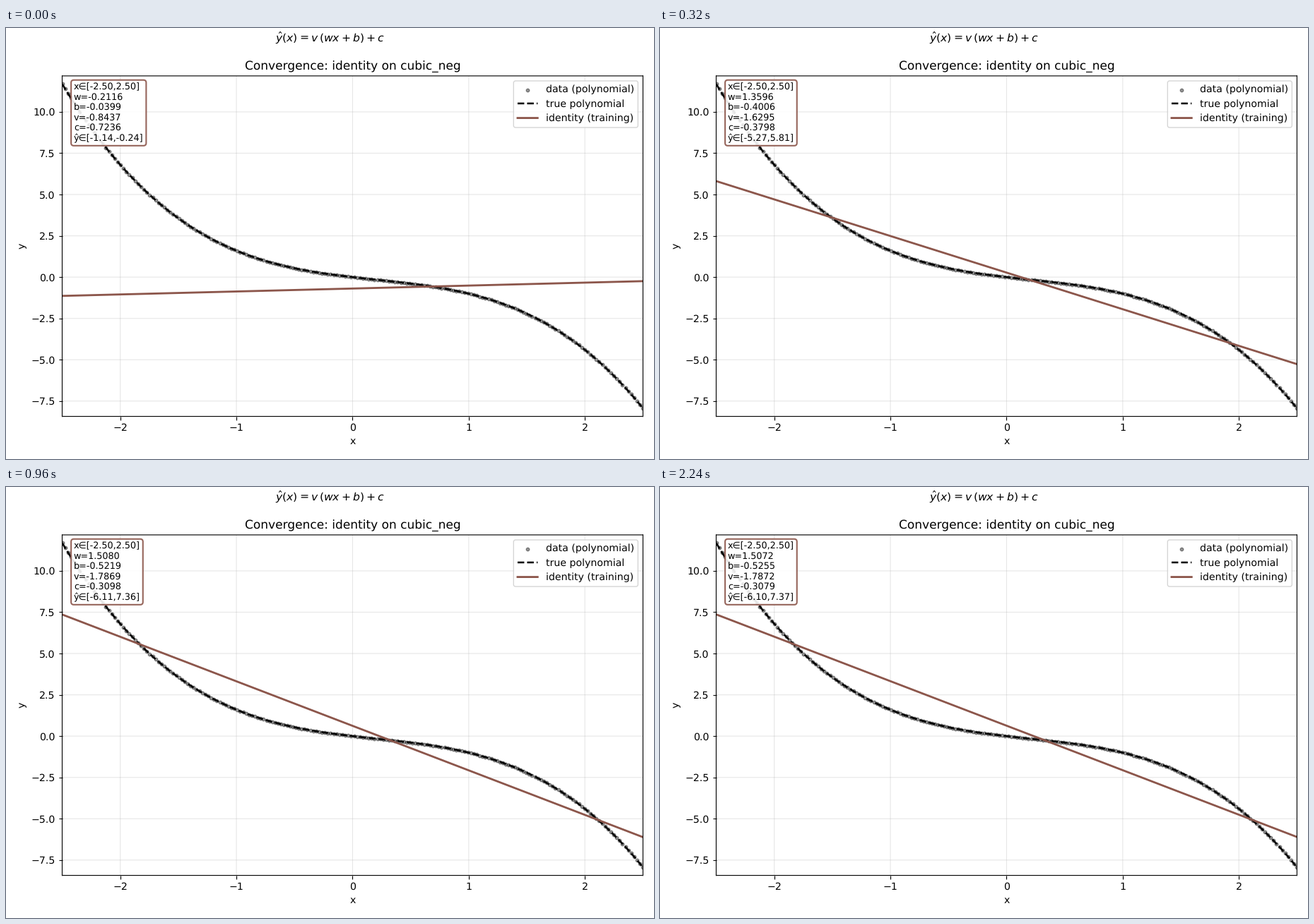
Recreate the animation shown at these times as a matplotlib script. Size 917 by 611 pixels, loop 3.31 s.

```python
import numpy as np
import matplotlib.pyplot as plt
from matplotlib.animation import FuncAnimation

W, H = 917, 611
DPI = 101.875
LEFT, RIGHT, TOP, BOTTOM = 79.5, 901.4, 67.9, 550.6
LOOP_MS, TICK_MS, HOLD_MS = 3310, 10, 80
SNAPSHOTS, STEPS_PER_SNAPSHOT, RATE = 29, 25, 0.002
START = -0.21164, -0.03988, -0.84366, -0.72357
BROWN = "#8c564b"

# Soft sub-pixel edges for lines and glyphs.
plt.rcParams.update({"font.family": "DejaVu Sans", "path.snap": False,
                     "text.hinting": "none"})

x = np.linspace(-2.5, 2.5, 200)
y = -0.5 * x**3 + 0.3 * x**2 - 0.8 * x


def train():
    """Gradient descent on the mean squared error of v(wx + b) + c."""
    w, b, v, c = START
    history = [START]
    for _ in range(SNAPSHOTS - 1):
        for _ in range(STEPS_PER_SNAPSHOT):
            hidden = w * x + b
            err = 2 * (v * hidden + c - y)
            grad = ((err * v * x).mean(), (err * v).mean(),
                    (err * hidden).mean(), err.mean())
            w, b, v, c = (p - RATE * g for p, g in zip((w, b, v, c), grad))
        history.append((w, b, v, c))
    return history


def summary(w, b, v, c, fit):
    return (f"x∈[{x.min():.2f},{x.max():.2f}]\n"
            f"w={w:.4f}\nb={b:.4f}\nv={v:.4f}\nc={c:.4f}\n"
            f"ŷ∈[{fit.min():.2f},{fit.max():.2f}]")


history = train()

# The tiny surplus keeps the pixel size from truncating downwards.
fig = plt.figure(figsize=((W + 1e-4) / DPI, (H + 1e-4) / DPI), dpi=DPI)
ax = fig.add_axes((LEFT / W, 1 - BOTTOM / H,
                   (RIGHT - LEFT) / W, (BOTTOM - TOP) / H))
fig.suptitle(r"$\hat{y}(x) = v\,(wx+b)+c$", fontsize=11, y=0.995)
ax.set_title("Convergence: identity on cubic_neg", y=1.0)
ax.set_xlabel("x")
ax.set_ylabel("y")
ax.grid(alpha=0.3)

pad = 0.025 * np.ptp(y)
ax.set_xlim(x.min(), x.max())
ax.set_ylim(y.min() - pad, y.max() + pad)

ax.scatter(x, y, s=10, color="black", alpha=0.4, label="data (polynomial)")
ax.plot(x, y, "k--", lw=1.8, label="true polynomial")
line, = ax.plot([], [], color=BROWN, lw=2, label="identity (training)")
ax.legend(loc="upper right")
info = ax.text(0.02, 0.98, "", transform=ax.transAxes, fontsize=9, va="top",
               linespacing=1.19,
               bbox=dict(boxstyle="round,pad=0.3", facecolor="white",
                         edgecolor=BROWN, linewidth=1.5, alpha=0.9))


def update(i):
    k = min(i * TICK_MS // HOLD_MS, SNAPSHOTS - 1)
    w, b, v, c = history[k]
    fit = v * (w * x + b) + c
    line.set_data(x, fit)
    info.set_text(summary(w, b, v, c, fit))
    return line, info


anim = FuncAnimation(fig, update, frames=LOOP_MS // TICK_MS,
                     init_func=lambda: update(0), interval=TICK_MS,
                     repeat=True, repeat_delay=0)
plt.show()
```
